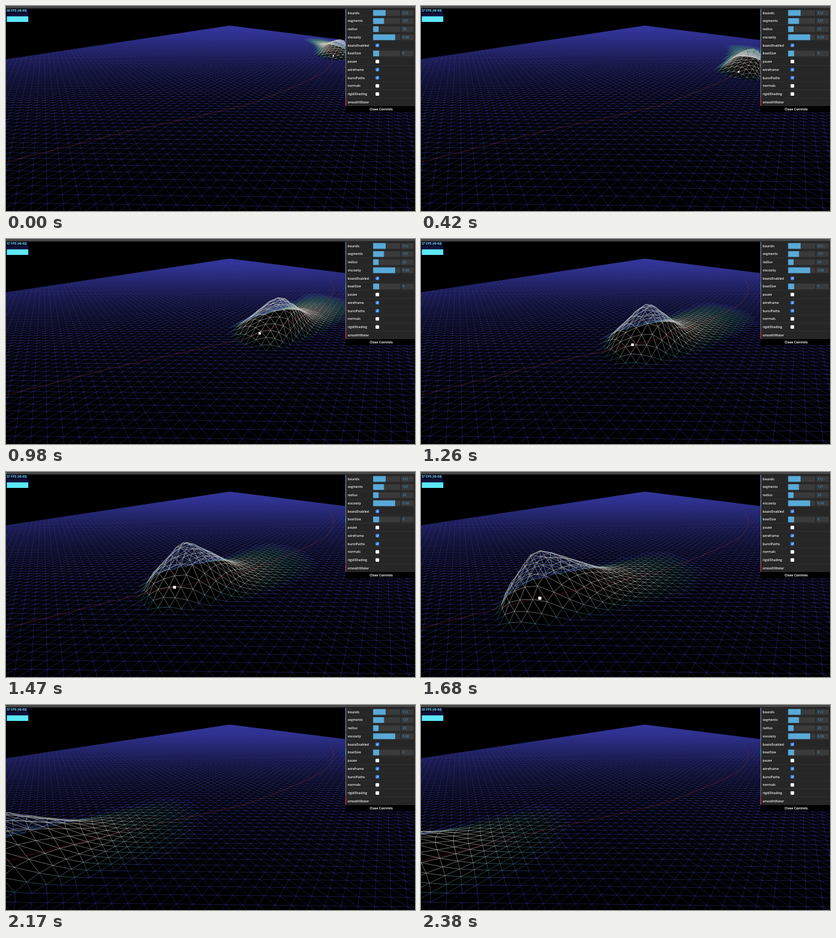
An HTML page with a canvas that plays this animation: 640 by 322 pixels, repeating every 2450 ms.

```html
<!DOCTYPE html>
<html lang="en">
<head>
<meta charset="utf-8">
<title>Wireframe water</title>
<style>
  html, body { margin: 0; width: 100%; height: 100%; overflow: hidden; background: #000; }
  canvas, svg { position: absolute; left: 0; top: 0; width: 640px; height: 322px; display: block; }
  text { font: 600 5.1px "Open Sans", sans-serif; fill: #eee; }
  .value { fill: #3a86b4; }
  .close { font-weight: 700; }
  .fps { font: 700 4.6px "Liberation Sans", Arial, sans-serif; fill: #7fe3f2; }
</style>
</head>
<body>
<canvas id="stage" width="640" height="322"></canvas>
<svg id="ui" viewBox="0 0 640 322">
  <rect width="640" height="4" fill="#484848"/>
  <rect y="3.4" width="640" height="1" fill="#222"/>
  <rect y="4.5" width="36" height="21" fill="#02021f"/>
  <rect x="1.3" y="11" width="33.5" height="14" fill="#11113a"/>
  <rect x="1.3" y="16.3" width="33.5" height="8.7" fill="#5ce8f5"/>
  <text id="fps" class="fps" x="1.2" y="9.4"></text>
</svg>
<script>
const LOOP = 2450, STEP = 70;
const ctx = document.getElementById('stage').getContext('2d');
const ui = document.getElementById('ui');
const fps = document.getElementById('fps');

// Control panel
function add(tag, attrs, text) {
  const el = document.createElementNS(ui.namespaceURI, tag);
  for (const k in attrs) el.setAttribute(k, attrs[k]);
  if (text) el.textContent = text;
  ui.appendChild(el);
}
const rect = (x, y, width, height, fill, rx = 0) => add('rect', { x, y, width, height, fill, rx });

const controls = [
  ['bounds', '512', 0.46], ['segments', '127', 0.4], ['radius', '20', 0.2], ['viscosity', '0.98', 0.81],
  ['boatsEnabled', true], ['boatSize', '6', 0.22], ['pause', false], ['wireframe', true],
  ['burstPaths', true], ['normals', false], ['rigidShading', false], ['smoothWater']
];
const ROW = 12.73;
const accents = { string: '#5f90b5', boolean: '#75687c', undefined: '#c4385a' };
controls.forEach(([label, value, fill], n) => {
  const top = 4.6 + n * ROW, mid = top + 6.3;
  const kind = typeof value;
  rect(531, top, 109, ROW, '#3a3a3a');
  rect(531, top, 109, ROW - 0.5, '#262626');
  rect(531, top, 1.2, ROW - 0.5, accents[kind]);
  add('text', { x: 534.5, y: mid + 1.8 }, label);
  if (kind === 'string') {
    rect(574.5, mid - 4.5, 42.5, 9, '#3a3a3a');
    rect(574.5, mid - 4.5, 42.5 * fill, 9, '#58aad8');
    rect(618.5, mid - 4.5, 19.5, 9, '#3a3a3a');
    add('text', { x: 620.5, y: mid + 1.8, class: 'value' }, value);
  } else if (kind === 'boolean') {
    rect(578.3, mid - 2.8, 5.6, 5.6, value ? '#3b80ee' : '#fff', 1.2);
    if (value) add('path', {
      d: `M579.7 ${mid}l1.1 1.3 1.9-2.8`, stroke: '#fff', 'stroke-width': 0.8, fill: 'none'
    });
  }
});
rect(531, 157.2, 109, 10, '#000');
add('text', { x: 587, y: 163.7, 'text-anchor': 'middle', class: 'close' }, 'Close Controls');

// Camera over a flat sheet: b to the right, g ahead, y up
const FOCAL = 207, CX = 320, CY = 163, HEIGHT = 55, SIN = 0.631, COS = 0.776;
function project(b, g, y = 0) {
  const drop = HEIGHT - y, z = g * COS + drop * SIN;
  return [CX + FOCAL * b / z, CY + FOCAL * (drop * COS - g * SIN) / z];
}

// Sheet of cells, counted from its far corner
const N = 127, CELL = 512 / N, FAR = [58.3, 473];
const U = [-0.714, -0.7], V = [0.7, -0.714];
const ground = (i, j) => [0, 1].map(k => FAR[k] + CELL * (i * U[k] + j * V[k]));
function toGrid(b, g) {
  const x = b - FAR[0], y = g - FAR[1];
  return [(x * U[0] + y * U[1]) / CELL, (x * V[0] + y * V[1]) / CELL];
}

const NEAR = -25;
const sheet = document.createElement('canvas');
sheet.width = 640;
sheet.height = 322;
{
  const c = sheet.getContext('2d');
  const line = (p, q) => {
    if (p[1] < q[1]) [p, q] = [q, p];
    if (p[1] < NEAR) return;
    if (q[1] < NEAR) {
      const k = (p[1] - NEAR) / (p[1] - q[1]);
      q = [p[0] + (q[0] - p[0]) * k, NEAR];
    }
    c.beginPath();
    c.moveTo(...project(...p));
    c.lineTo(...project(...q));
    c.stroke();
  };
  c.fillRect(0, 0, 640, 322);
  c.strokeStyle = 'rgb(54,56,156)';
  c.lineWidth = 0.42;
  for (let n = 0; n <= N; n++) {
    line(ground(n, 0), ground(n, N));
    line(ground(0, n), ground(N, n));
  }
  for (let n = 1; n < 2 * N; n++) {
    const lo = Math.max(0, n - N), hi = Math.min(n, N);
    line(ground(lo, n - lo), ground(hi, n - hi));
  }
}

// Boat course: time, b, g
const course = [
  [-980, 205, 310], [-560, 200, 262], [-280, 190, 227], [0, 163, 181.7], [420, 115.6, 129.5],
  [980, 35.6, 78.5], [1260, 4.5, 65.6], [1680, -46.7, 48.2], [1960, -73.5, 37.6],
  [2380, -113, 22], [2800, -150, 8]
];
function boat(t) {
  let n = 1;
  while (n < course.length - 3 && course[n + 1][0] <= t) n++;
  const [p0, p1, p2, p3] = course.slice(n - 1, n + 3);
  const d = p2[0] - p1[0], s = (t - p1[0]) / d;
  const s2 = s * s, s3 = s2 * s;
  return [1, 2].map(k => {
    const m1 = (p2[k] - p0[k]) / (p2[0] - p0[0]) * d;
    const m2 = (p3[k] - p1[k]) / (p3[0] - p1[0]) * d;
    return (2 * s3 - 3 * s2 + 1) * p1[k] + (s3 - 2 * s2 + s) * m1 +
           (3 * s2 - 2 * s3) * p2[k] + (s3 - s2) * m2;
  });
}

function ramp(stops, x) {
  let n = 0;
  while (n < stops.length - 2 && stops[n + 1][0] < x) n++;
  const [a, b] = [stops[n], stops[n + 1]];
  const k = Math.min(1, Math.max(0, (x - a[0]) / (b[0] - a[0])));
  return a.slice(1).map((v, m) => v + (b[m + 1] - v) * k);
}
const LIFE = 630, SHADES = 14;
const swell = [[0, 0.62], [75, 1], [160, 0.7], [260, 0.26], [350, 0.06], [LIFE, 0]];
const palette = (...bright) => Array.from({ length: SHADES + 1 }, (_, n) =>
  `rgb(${ramp([[0, 54, 56, 156], [0.35, 62, 118, 132], [0.75, ...bright]], n / SHADES)})`);
const front = palette(198, 194, 186), back = palette(165, 192, 226);

// Lifted vertices: the tallest of the swells left along the wake
function wake(t) {
  const points = new Map();
  for (let age = 0; age < LIFE; age += 25) {
    const [b, g] = boat(t - age);
    const peak = Math.min(27, 17 + Math.max(0, t - age) * 0.0075) * ramp(swell, age)[0];
    const glow = 1 - 0.75 * (age / LIFE) ** 2;
    const radius = 18.5 + 4.5 * age / LIFE, reach = Math.ceil(radius / CELL);
    const [ci, cj] = toGrid(b, g).map(Math.round);
    for (let i = ci - reach; i <= ci + reach; i++) {
      for (let j = cj - reach; j <= cj + reach; j++) {
        if (i < 0 || j < 0 || i > N || j > N) continue;
        const [pb, pg] = ground(i, j);
        const inside = 1 - ((pb - b) ** 2 + (pg - g) ** 2) / radius ** 2;
        if (inside <= 0) continue;
        const key = i * 200 + j;
        const p = points.get(key) || { i, j, y: 0, c: 0 };
        p.y = Math.max(p.y, peak * inside ** 1.35);
        p.c = Math.max(p.c, glow * Math.sqrt(inside));
        points.set(key, p);
      }
    }
  }
  return points;
}

function drawWake(t) {
  const points = wake(t), cells = new Map();
  for (const { i, j } of points.values()) {
    for (const [a, b] of [[i, j], [i - 1, j], [i, j - 1], [i - 1, j - 1]]) cells.set(a * 200 + b, [a, b]);
  }
  ctx.beginPath();
  for (const [i, j] of cells.values()) {
    ctx.moveTo(...project(...ground(i, j)));
    ctx.lineTo(...project(...ground(i + 1, j)));
    ctx.lineTo(...project(...ground(i + 1, j + 1)));
    ctx.lineTo(...project(...ground(i, j + 1)));
    ctx.closePath();
  }
  ctx.fillStyle = '#000';
  ctx.fill();

  const vertex = (i, j) => {
    const { y, c } = points.get(i * 200 + j) || { y: 0, c: 0 };
    return { at: project(...ground(i, j), y), c };
  };
  const layers = [back, front].map(shades => shades.map(() => new Path2D()));
  const edge = (layer, p, q) => {
    const path = layer[Math.round((p.c + q.c) / 2 * SHADES)];
    path.moveTo(...p.at);
    path.lineTo(...q.at);
  };
  for (const [i, j] of cells.values()) {
    const a = vertex(i, j), b = vertex(i + 1, j), c = vertex(i, j + 1);
    // The far slope of the swell is seen from below and looks cooler
    const turn = (b.at[0] - a.at[0]) * (c.at[1] - a.at[1]) - (b.at[1] - a.at[1]) * (c.at[0] - a.at[0]);
    const layer = layers[turn < 0 ? 1 : 0];
    edge(layer, a, b);
    edge(layer, a, c);
    edge(layer, b, c);
  }
  ctx.lineWidth = 0.55;
  [back, front].forEach((shades, k) => shades.forEach((shade, n) => {
    ctx.strokeStyle = shade;
    ctx.stroke(layers[k][n]);
  }));
}

const trail = new Path2D();
for (let t = -280; t <= 2400; t += 20) trail.lineTo(...project(...boat(t)));

function draw(t) {
  ctx.drawImage(sheet, 0, 0);
  drawWake(t);
  ctx.strokeStyle = 'rgba(125,45,50,.75)';
  ctx.lineWidth = 0.65;
  ctx.stroke(trail);

  const [b, g] = boat(t);
  const [x, y] = project(b, g);
  const size = 1.7 * FOCAL / (g * COS + HEIGHT * SIN);
  ctx.fillStyle = '#fff';
  ctx.fillRect(x - size / 2, y - size / 2, size, size);

  const label = t >= 210 && t < 2310 ? '57 FPS (40-60)' : '60 FPS (40-60)';
  if (fps.textContent !== label) fps.textContent = label;
}

const start = performance.now();
let shown = -1;
function tick() {
  const t = Math.floor((performance.now() - start) % LOOP / STEP) * STEP;
  if (t !== shown) draw(shown = t);
  requestAnimationFrame(tick);
}
tick();
</script>
</body>
</html>
```
